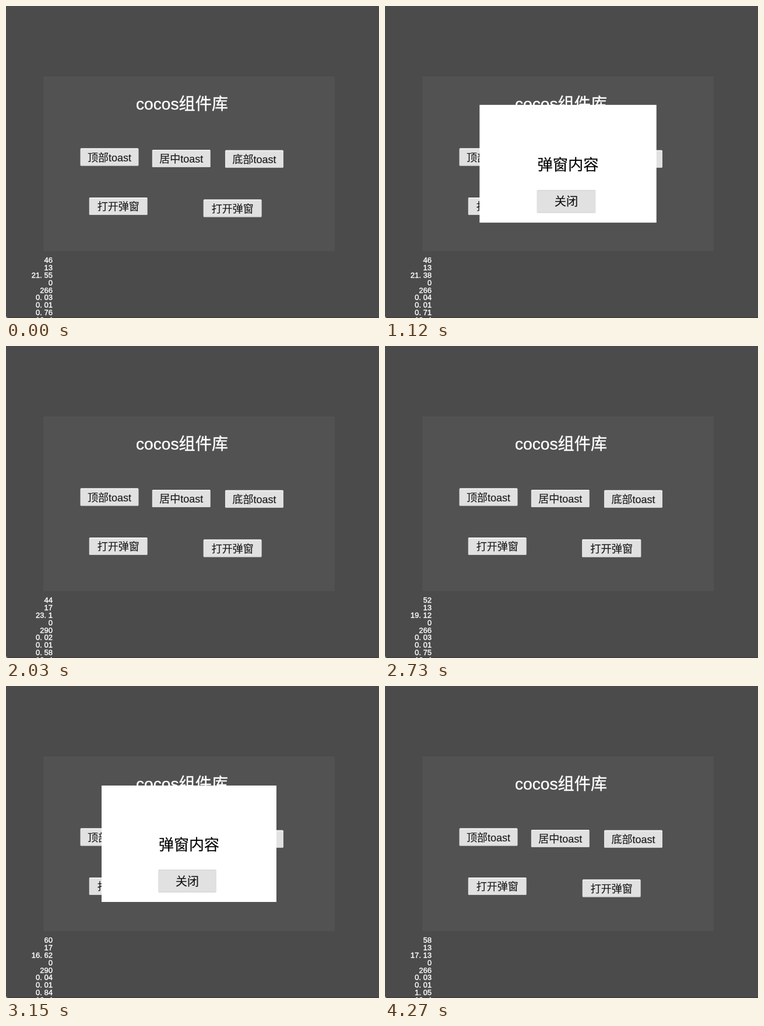
Recreate the animation shown at these times as an HTML page with a canvas. Size 640x536 px, loop 4340 ms.

```html
<!DOCTYPE html>
<html lang="zh-CN">
<head>
<meta charset="utf-8">
<style>
html, body { margin: 0; width: 100%; height: 100%; overflow: hidden; background: #4b4b4b; }
canvas { display: block; }
</style>
</head>
<body>
<canvas id="stage" width="640" height="536"></canvas>
<script>
const ctx = document.getElementById('stage').getContext('2d');
const LOOP = 4340, STEP = 70, OPENING = 260;
const FONT = '"Liberation Sans", "Noto Sans CJK SC", "Noto Sans CJK", sans-serif';

const popups = [{ open: 987, close: 1960 }, { open: 2859, close: 3850 }];

// The profiler alternates between the plain scene and the scene with a popup.
const stats = [
  { from: 0, fps: 46, frame: '21. 55', logic: 3, render: '0. 76' },
  { from: 490, fps: 46, frame: '21. 38', logic: 4, render: '0. 71' },
  { from: 1680, fps: 44, frame: '23. 1', logic: 2, render: '0. 58', busy: true },
  { from: 2240, fps: 52, frame: '19. 12', logic: 3, render: '0. 75' },
  { from: 3080, fps: 60, frame: '16. 62', logic: 4, render: '0. 84', busy: true },
  { from: 4200, fps: 58, frame: '17. 13', logic: 3, render: '1. 05' }
];

const ramp = (t, start, length) => Math.min(1, Math.max(0, (t - start) / length));

function backOut(u, s = 1.05) {
  const v = u - 1;
  return 1 + v * v * ((s + 1) * v + s);
}

// Grows while held down, shrinks back after the release that opens the popup.
const zoom = (t, { open }) => 1 + .12 * (ramp(t, open - 140, 100) - ramp(t, open, 100));

function rect(x, y, w, h, color) {
  ctx.fillStyle = color;
  ctx.fillRect(x, y, w, h);
}

function text(str, x, y, size, color, align = 'center') {
  ctx.font = `${size}px ${FONT}`;
  ctx.textAlign = align;
  ctx.fillStyle = ctx.strokeStyle = color;
  ctx.fillText(str, x, y);
  ctx.lineWidth = color === '#fff' ? .4 : .15;
  ctx.strokeText(str, x, y);
}

function scaled(x, y, s, draw) {
  ctx.save();
  ctx.translate(x, y);
  ctx.scale(s, s);
  draw();
  ctx.restore();
}

function plate(w, h, top, face, bottom) {
  ctx.beginPath();
  ctx.roundRect(-w / 2, -h / 2, w, h, 1.5);
  ctx.fillStyle = face;
  ctx.fill();
  rect(-w / 2 + 1, -h / 2, w - 2, 1.5, top);
  rect(-w / 2 + 1, h / 2 - 1, w - 2, 1, bottom);
}

function button(label, x, y, s = 1) {
  scaled(x, y, s, () => {
    plate(100, 30, '#f6f6f6', '#e1e1e1', '#d2d2d2');
    text(label, 0, 7.3, 18, '#1c1c1c');
  });
}

function popup(s, press) {
  scaled(314, 271, s, () => {
    rect(-150, -100, 300, 200, '#fff');
    text('弹窗内容', 0, 10.8, 26, '#000');
    ctx.translate(-3, 64);
    const gray = (a, b) => `rgb(${Array(3).fill(Math.round(a + (b - a) * press))})`;
    plate(100, 39, gray(217, 84), gray(225, 103), gray(212, 90));
    text('关闭', 0, 7.5, 20, '#111');
  });
}

function profiler(t) {
  const { fps, frame, logic, render, busy } = stats.findLast(s => s.from <= t);
  const rows = [fps, busy ? 17 : 13, frame, 0, busy ? 290 : 266, `0. 0${logic}`, '0. 01', render, '10. 4'];
  rows.forEach((row, i) => text(row, 80, 441.2 + i * 12.85, 13, '#fff', 'right'));
}

function draw(t) {
  rect(0, 0, 640, 536, '#4b4b4b');
  rect(64, 121, 500, 300, '#525252');
  text('cocos组件库', 302, 177.8, 28.2, '#fff');
  button('顶部toast', 177.5, 259.5);
  button('居中toast', 300.8, 262);
  button('底部toast', 426, 262.8);
  button('打开弹窗', 192.7, 344, zoom(t, popups[0]));
  button('打开弹窗', 388.7, 347.5, zoom(t, popups[1]));

  rect(0, 534.5, 640, 1.5, '#443d40');
  rect(0, 534, 2, 1.5, '#ccc');
  profiler(t);

  const shown = popups.find(p => t > p.open && t < p.close);
  if (shown) popup(backOut(ramp(t, shown.open, OPENING)), ramp(t, shown.close - 280, 100));
}

function tick(now) {
  draw(Math.floor(now % LOOP / STEP) * STEP);
  requestAnimationFrame(tick);
}
draw(0);
requestAnimationFrame(tick);
</script>
</body>
</html>
```
